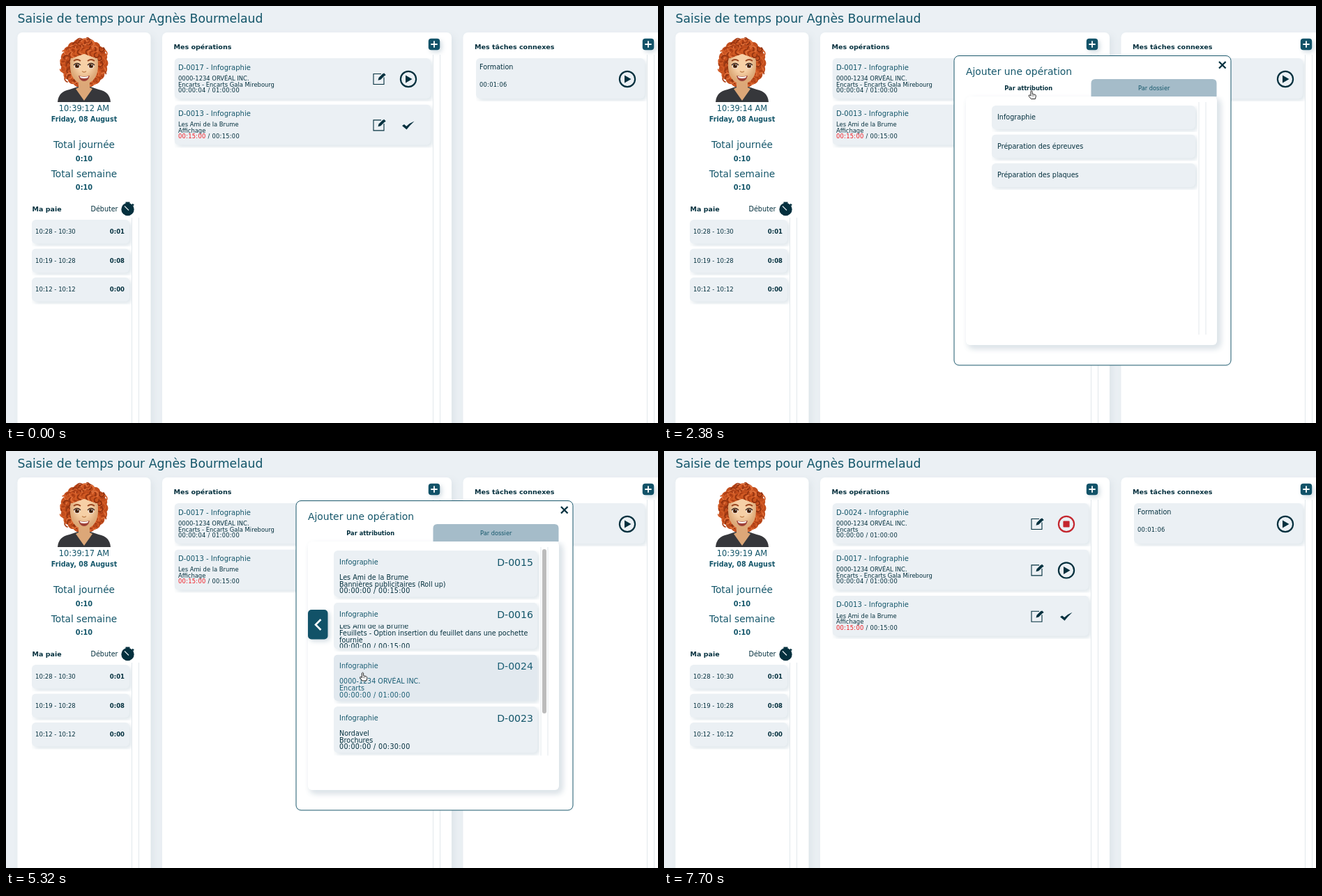
These frames come from a looping animation (935 by 599 pixels, 7980 ms). An HTML page:

```html
<!DOCTYPE html>
<html lang="fr">
<head>
<meta charset="utf-8">
<title>Saisie de temps</title>
<style>
html, body { margin: 0; width: 100%; height: 100%; overflow: hidden; background: #ebf0f4; }
#stage { display: block; font-family: "DejaVu Sans", Verdana, sans-serif; }
text { fill: #04303e; white-space: pre; }
.teal { fill: #14566a; }
.bold { font-weight: bold; }
.red { fill: #f01820; }
.white { fill: #fff; }
.time { letter-spacing: .034em; }
.panel { fill: #fff; filter: drop-shadow(4px 4px 4px #dde4e9); }
.card { fill: #ebf0f4; filter: drop-shadow(3px 3px 3px #dde5ea); }
.button { fill: #115268; filter: drop-shadow(3px 3px 3px #d3dde3); }
.rail { stroke: #e2e8ec; }
.line { fill: none; stroke: #04303e; }
.hover .card { fill: #e2e9ef; }
.hover text { fill: #1d6076; }
#addOperation.hover .button { fill: #3b7c90; }
</style>
</head>
<body>
<svg id="stage" width="935" height="599" viewBox="0 0 935 599"></svg>
<script>
const LOOP = 7980, STEP = 70;
const CLIENT_A = '0000-1234 ORVÉAL INC.', CLIENT_B = 'Les Ami de la Brume';

const text = (x, y, size, str, cls = '', anchor = 'start') =>
  `<text x="${x}" y="${y}" font-size="${size}" class="${cls}" text-anchor="${anchor}">${str}</text>`;
const mid = (x, y, size, str, cls) => text(x, y, size, str, cls, 'middle');
const rect = (x, y, w, h, r, attrs = '') =>
  `<rect x="${x}" y="${y}" width="${w}" height="${h}" rx="${r}" ${attrs}/>`;
const path = (d, attrs) => `<path d="${d}" ${attrs}/>`;
const circle = (x, y, r, attrs) => `<circle cx="${x}" cy="${y}" r="${r}" ${attrs}/>`;
const group = (id, body, attrs = '') => `<g id="${id}" ${attrs}>${body}</g>`;
const repeat = (n, fn) => Array.from({ length: n }, (_, i) => fn(i)).join('');

// The nested svg crops the card's shadow to its own row.
const card = (x, y, w, h) =>
  `<svg x="${x}" y="${y}" width="${w}" height="${h}">${rect(0, 0, w - 3, h - 4, 6, 'class="card"')}</svg>`;
const rails = (x, top, bottom) => path(`M${x} ${top}V${bottom}M${x + 10} ${top}V${bottom}`, 'class="rail"');

const plus = (x, y) => rect(x - 8.2, y - 8.2, 16.4, 16.4, 4, 'class="button"') +
  path(`M${x - 4} ${y}h8M${x} ${y - 4}v8`, 'stroke="#fff" stroke-width="1.8" stroke-linecap="round"');
const play = (x, y) => circle(x, y, 11.1, 'class="line" stroke-width="2.2"') +
  path(`M${x - 4} ${y - 5.5}L${x + 5.5} ${y}L${x - 4} ${y + 5.5}Z`, 'fill="#04303e"');
const stop = (x, y) => circle(x, y, 11.1, 'fill="none" stroke="#c4262e" stroke-width="2.2"') +
  rect(x - 4.6, y - 4.6, 9.2, 9.2, 1, 'fill="#c4262e"');
const check = (x, y) => path(
  `M${x - 9} ${y + .5}l3-1.8 3.2 2.6Q${x + 2} ${y - 3.5} ${x + 8.5} ${y - 6}Q${x + 2} ${y} ${x - 2.5} ${y + 6}Z`,
  'fill="#04303e"');
const edit = (x, y) =>
  path(`M${x + 3} ${y - 7.5}h-11v15h15v-10`, 'class="line" stroke-width="1.1"') +
  path(`M${x - 1.5} ${y + 1.8}l1-3.8 6-6 2.8 2.8-6 6Z`, 'fill="#04303e"') +
  path(`M${x + 6.4} ${y - 8}l2.6 2.6`, 'class="line" stroke-width="1.8"');

function operation(row, title, client, job, spent, planned, icon, late) {
  const y = 75 + row * 66.4;
  return card(241.5, y, 370.5, 62) +
    text(247, y + 16.5, 10, `${title} - Infographie`, 'teal') +
    text(247, y + 32, 8.4, client) +
    text(247, y + 40.5, 8.4, job) +
    text(247, y + 49, 8.3, `<tspan class="${late ? 'red' : ''}">${spent}</tspan> / ${planned}`, 'time') +
    edit(535, y + 30) + icon(577, y + 30);
}
const gala = row => operation(row, 'D-0017', CLIENT_A, 'Encarts - Encarts Gala Mirebourg', '00:00:04', '01:00:00', play);
const poster = row => operation(row, 'D-0013', CLIENT_B, 'Affichage', '00:15:00', '00:15:00', check, true);
const insert = row => operation(row, 'D-0024', CLIENT_A, 'Encarts', '00:00:00', '01:00:00', stop);

function avatar() {
  const noise = i => Math.abs(Math.sin(i * 91.7) * 437.5) % 1;
  const tones = ['#e2723c', '#a83c14', '#d45c26', '#8f3210'];
  const curl = (x, y, r, i) => path(`M${x - r} ${y}a${r} ${r} 0 1 1 ${r} ${r}`,
    `fill="none" stroke="${tones[i % 4]}" stroke-width="1.7" stroke-linecap="round" transform="rotate(${noise(i) * 360} ${x} ${y})"`);
  const back = repeat(20, i => {
    const a = i * Math.PI / 10;
    return circle(112 + 27 * Math.cos(a), 82 + 28 * Math.sin(a), 7.5, 'fill="#c14d1d"');
  });
  const ring = repeat(60, i => {
    const a = i * 2.4, k = .72 + noise(i + 5) * .3;
    return curl(112 + 31 * k * Math.cos(a), 82 + 33 * k * Math.sin(a), 3.2 + noise(i + 9) * 2, i);
  });
  const fringe = repeat(13, i => {
    const x = 94 + i * 3, y = 64 + Math.abs(i - 6) * 1.1;
    return circle(x, y, 4.5, 'fill="#c9541f"') + curl(x, y, 3.4, i + 3);
  });
  const eye = x => `<ellipse cx="${x}" cy="86" rx="4.3" ry="4" fill="#fff"/>` +
    circle(x, 86, 3.2, 'fill="#6b3b1e"') + circle(x, 86, 1.7, 'fill="#1c100a"') + circle(x + 1, 84.8, .8, 'fill="#fff"') +
    path(`M${x - 5} 85q5-6 10 0`, 'fill="none" stroke="#2c1a12" stroke-width="1.2"') +
    path(`M${x - 5} 79q5-4 10 0`, 'fill="none" stroke="#99451f" stroke-width="1.8"');
  return `<defs><radialGradient id="skin" cy=".4"><stop offset=".5" stop-color="#f6d0a6"/><stop offset="1" stop-color="#dda978"/></radialGradient></defs>` +
    back + ring +
    path('M74 138Q75 123 91 120L103 116H121L133 120Q149 123 150 138Z', 'fill="#36373b"') +
    path('M104 107H120V117L124 119 112 136 100 119 104 117Z', 'fill="#dca778"') +
    path('M92 82Q92 62 112 62T132 82Q133 101 122 109Q112 116 102 109Q91 101 92 82Z', 'fill="url(#skin)"') +
    fringe + eye(102) + eye(122) +
    path('M109.5 94q2.5 2 5 0', 'fill="none" stroke="#c48653" stroke-width="1.5" stroke-linecap="round"') +
    path('M104 100Q112 102.5 120 100Q118 108 112 108T104 100Z', 'fill="#9d3f36"') +
    path('M105.5 100.8Q112 102.6 118.5 100.8L117 103.3Q112 104.5 107 103.3Z', 'fill="#fff"');
}

function sidebar() {
  const shifts = [['10:28 - 10:30', '0:01'], ['10:19 - 10:28', '0:08'], ['10:12 - 10:12', '0:00']];
  return rect(16.5, 38, 191, 590, 7, 'class="panel"') + avatar() +
    '<text id="clock" x="112" y="151" font-size="11.4" class="teal" text-anchor="middle"></text>' +
    mid(112, 166, 9.6, 'Friday, 08 August', 'teal bold') +
    mid(112, 204, 13.7, 'Total journée', 'teal') + mid(112, 222.5, 9.8, '0:10', 'teal bold') +
    mid(112, 245.5, 13.7, 'Total semaine', 'teal') + mid(112, 264, 9.8, '0:10', 'teal bold') +
    text(37.5, 295, 9.5, 'Ma paie', 'bold') + text(121.5, 295, 9.6, 'Débuter') +
    circle(174.5, 292, 9.2, 'fill="#04303e"') +
    path('M171.5 282.5h6M181 284.5l2 2', 'class="line" stroke-width="2.2"') +
    path('M170 287.5l6 6', 'stroke="#dfe8ec" stroke-width="1.3"') +
    rails(180.5, 304, 599) +
    shifts.map(([span, total], i) => {
      const y = 307 + i * 41.5;
      return card(37, y, 143, 38.5) + text(42, y + 20, 8.55, span) + text(170, y + 20, 8.5, total, 'bold', 'end');
    }).join('');
}

const page = () =>
  text(16.5, 24, 17.3, 'Saisie de temps pour Agnès Bourmelaud', 'teal') + sidebar() +
  rect(224, 38, 415, 590, 7, 'class="panel"') + rect(655.5, 38, 300, 590, 7, 'class="panel"') +
  text(240.5, 62, 9.55, 'Mes opérations', 'bold') + text(672, 62, 9.55, 'Mes tâches connexes', 'bold') +
  rails(612.5, 70, 599) + rails(919.5, 70, 599) +
  group('addOperation', plus(614, 55)) + plus(921, 55) +
  card(674, 75, 245, 62) + text(679, 91, 9.6, 'Formation') +
  text(679, 115.5, 8.3, '00:01:06', 'time') + play(891, 105) +
  group('before', gala(0) + poster(1)) + group('after', insert(0) + gala(1) + poster(2));

function tabs(active) {
  const x = active ? 433 : 612.5;
  const tab = (i, label) => mid(522.7 + i * 180, 120.5, 8.25, label, i === active ? 'bold' : 'teal');
  return rect(433, 104, 367, 26, 0, 'fill="#fff"') + rect(433, 130, 360, 357, 6, 'class="panel"') +
    path(`M${x} 130v-19q0-6 6-6h168q6 0 6 6v19z`, 'fill="#a5bcc9"') +
    tab(0, 'Par attribution') + tab(1, 'Par dossier');
}

const fileTab = () => tabs(1) +
  text(454.5, 159, 8.27, 'Numéro de dossier', 'bold') +
  rect(454.5, 165, 222.5, 25, 5, 'fill="#ebf0f4"') +
  rect(687, 165.5, 78, 23.5, 5, 'class="button" style="fill:#02333f"') +
  mid(726, 180, 8.3, 'Chercher', 'white');

const taskList = () => rails(767, 138, 472) +
  ['Infographie', 'Préparation des épreuves', 'Préparation des plaques'].map((name, i) =>
    group('task' + i, card(470, 143 + i * 41.5, 295, 38) + text(478, 163 + i * 41.5, 9.65, name))).join('');

function jobList() {
  const jobs = [
    ['D-0015', CLIENT_B, 'Bannières publicitaires (Roll up)', '00:00:00 / 00:15:00'],
    ['D-0016', CLIENT_B, 'Feuillets - Option insertion du feuillet dans une pochette', 'fournie', '00:00:00 / 00:15:00'],
    ['D-0024', CLIENT_A, 'Encarts', '00:00:00 / 01:00:00'],
    ['D-0023', 'Nordavel', 'Brochures', '00:00:00 / 00:30:00']
  ];
  const item = ([number, ...lines], i) => {
    const y = 143 + i * 74.7, first = lines.length > 3 ? 5.5 : 10;
    const body = lines.map((line, k) =>
      text(8, first + k * 9.7, 9.6, line, k === lines.length - 1 ? 'time' : '')).join('');
    return group('job' + i, card(470, y, 295, 70.5) +
      text(478, y + 20, 9.75, 'Infographie', 'teal') + text(756, y + 22, 14.1, number, 'teal', 'end') +
      `<svg x="470" y="${y + 32}" width="295" height="33">${body}</svg>`);
  };
  return rails(767, 138, 437.5) + jobs.map(item).join('') +
    rect(769, 141, 6, 236, 3, 'fill="#bcbcbc"') +
    rect(433, 228, 28.5, 42.5, 5, 'class="button"') +
    path('M451.5 242l-7.5 7.5 7.5 7.5', 'fill="none" stroke="#fff" stroke-width="2.6"');
}

const dialog = () =>
  rect(416, 71.5, 397, 444.5, 7, 'fill="#fff" stroke="#1b586c"') +
  text(433, 98.5, 13.9, 'Ajouter une opération', 'teal') +
  path('M796 80l9.5 9.5m0-9.5l-9.5 9.5', 'class="line" stroke-width="2.3"') +
  group('byFile', fileTab()) +
  group('byTask', tabs(0) + group('tasks', taskList()) + group('jobs', jobList()));

const cursors = () =>
  path('M0 0V9.7L2.2 7.6 3.6 11 5.3 10.3 3.9 7H6.9Z', 'id="arrow" stroke="#fff" stroke-width=".7"') +
  path('M-1.1 1Q0-.7 1.1 1V4.8L5 5.8Q6.7 6.4 6.3 8.4L5.4 12H-.6L-3.8 8Q-4.2 6-2.6 6.5L-1.1 7.6Z',
    'id="hand" fill="#fff" stroke="#111" stroke-width=".9"') +
  path('M1.2 6v2.4M3.2 6.4v2', 'id="knuckles" stroke="#111" stroke-width=".6"');

document.getElementById('stage').innerHTML =
  page() + group('dialog', dialog()) + group('cursor', cursors());

const el = id => document.getElementById(id);
const show = (id, on) => el(id).setAttribute('display', on ? 'inline' : 'none');
const fade = (id, amount) => { show(id, amount > 0); el(id).setAttribute('opacity', amount); };
const hover = (id, on) => el(id).classList.toggle('hover', on);
const within = (t, from, to) => t >= from && t < to;
const ramp = (t, from, to) => Math.min(1, Math.max(0, (t - from) / (to - from)));

// Pointer route: time, x, y.
const route = [
  [70, 514, 497], [280, 540, 300], [490, 582, 90], [630, 597, 16], [840, 601, 30], [910, 604, 37],
  [1120, 612, 56], [1750, 612, 56], [2100, 527, 121.5], [2660, 527, 121.5], [3080, 524, 161],
  [3290, 524, 161], [3430, 530, 169], [3640, 520, 162.5], [3990, 520, 162.5], [4550, 513, 207.5],
  [4830, 512, 279], [5110, 511.5, 318], [6510, 511.5, 318], [6720, 515, 318],
  [7070, 515, 318], [7420, 516, 400], [7700, 516, 602]
];
const ticks = [560, 1540, 2590, 3570, 4620, 6580, 7580];

function pointerAt(t) {
  const i = Math.max(1, route.findIndex(p => p[0] > t));
  const [t0, x0, y0] = route[i - 1], [t1, x1, y1] = route[i];
  const k = ramp(t, t0, t1);
  return [x0 + (x1 - x0) * k, y0 + (y1 - y0) * k];
}

function render(time) {
  const t = Math.floor(time % LOOP / STEP) * STEP;
  el('clock').textContent = `10:39:${12 + ticks.filter(tick => t >= tick).length} AM`;

  show('before', t < 5530);
  show('after', t >= 5530);
  fade('dialog', t < 5530 ? ramp(t, 1260, 1470) : 0);
  fade('byTask', ramp(t, 2170, 2380));
  show('tasks', t < 3850);
  show('jobs', t >= 3850);

  hover('addOperation', within(t, 1050, 1890));
  hover('task0', within(t, 2940, 3850));
  hover('job0', within(t, 3850, 4620));
  hover('job1', within(t, 4620, 4900));
  hover('job2', within(t, 4900, 5530));

  const visible = within(t, 70, 7700);
  show('cursor', visible);
  if (visible) {
    const pointing = within(t, 1050, 1890) || within(t, 2100, 5530);
    show('arrow', !pointing);
    show('hand', pointing);
    show('knuckles', pointing);
    el('cursor').setAttribute('transform', `translate(${pointerAt(t).join(' ')})`);
  }
}

const start = performance.now();
function frame() {
  render(performance.now() - start);
  requestAnimationFrame(frame);
}
frame();
</script>
</body>
</html>
```
